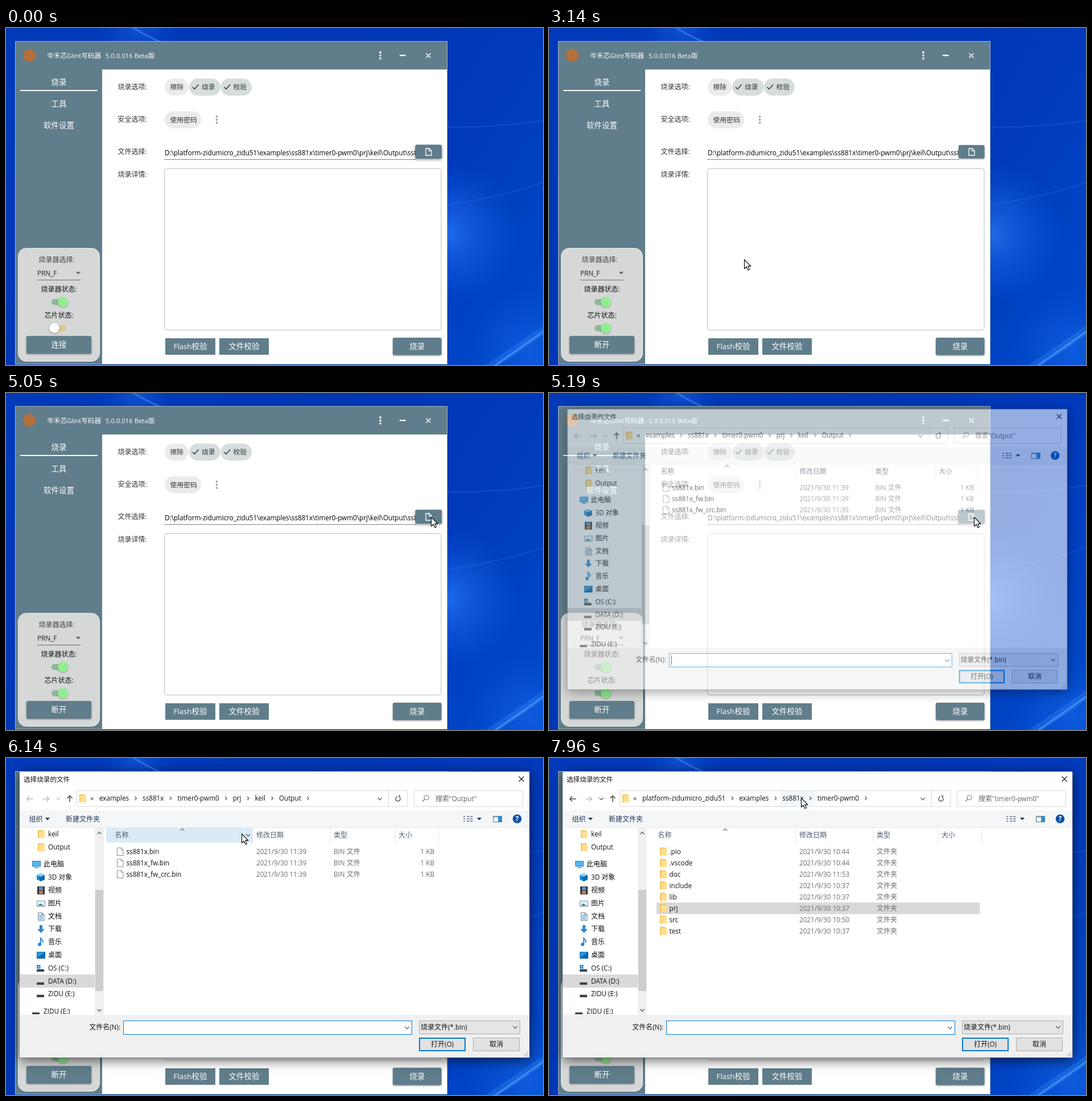
An HTML page with a canvas that plays this animation: 944x593 px, repeating every 8 s.

```html
<!DOCTYPE html>
<html lang="zh-CN">
<head>
<meta charset="utf-8">
<style>
html, body { margin: 0; width: 100%; height: 100%; overflow: hidden; background: #0038b8; }
canvas { display: block; }
</style>
</head>
<body>
<canvas id="stage" width="944" height="593"></canvas>
<script>
const LOOP = 8000, W = 944, H = 593, SLATE = '#607d8b';
const LATIN = '"Open Sans","Noto Sans",sans-serif';
const HAN = '"Noto Sans CJK SC","Noto Sans CJK","Noto Sans",sans-serif';
const screen = document.getElementById('stage').getContext('2d');
let g = screen;

function layer() {
  const c = document.createElement('canvas');
  c.width = W; c.height = H;
  return c.getContext('2d');
}
const clamp = v => Math.max(0, Math.min(1, v));
const ramp = (t, a, b) => clamp((t - a) / (b - a));
const ease = p => 1 - (1 - p) ** 3;

function rect(x, y, w, h, fill) { g.fillStyle = fill; g.fillRect(x, y, w, h); }
function frame(x, y, w, h, color, lw = 1) {
  g.strokeStyle = color; g.lineWidth = lw;
  g.strokeRect(x + lw / 2, y + lw / 2, w - lw, h - lw);
}
function round(x, y, w, h, r, fill, edge) {
  g.beginPath(); g.roundRect(x, y, w, h, r);
  if (fill) { g.fillStyle = fill; g.fill(); }
  if (edge) { g.strokeStyle = edge; g.lineWidth = 1; g.stroke(); }
}
function disc(x, y, r, fill) {
  g.beginPath(); g.arc(x, y, r, 0, 7); g.fillStyle = fill; g.fill();
}
function line(pts, color, lw = 1) {
  g.beginPath();
  for (let i = 0; i < pts.length; i += 2) g.lineTo(pts[i], pts[i + 1]);
  g.strokeStyle = color; g.lineWidth = lw; g.stroke();
}
function poly(pts, fill) {
  g.beginPath();
  for (let i = 0; i < pts.length; i += 2) g.lineTo(pts[i], pts[i + 1]);
  g.closePath(); g.fillStyle = fill; g.fill();
}
function shadow(blur, dy, color, draw) {
  g.save();
  g.shadowBlur = blur; g.shadowOffsetY = dy; g.shadowColor = color;
  draw();
  g.restore();
}

// Han and Latin runs are set in separate faces; y is the visual centre.
function runs(str, size, weight) {
  return str.match(/[\u3000-\u9fff]+|[^\u3000-\u9fff]+/g).map(s => {
    const han = s.charCodeAt(0) >= 0x3000;
    const font = `${weight} ${han ? size : size * 0.975}px ${han ? HAN : LATIN}`;
    g.font = font;
    return { s, font, w: g.measureText(s).width };
  });
}
function text(str, x, y, color = '#222', size = 12, align = 0, weight = 400) {
  const parts = runs(str, size, weight);
  const width = parts.reduce((sum, p) => sum + p.w, 0);
  x -= width * align;
  g.fillStyle = color;
  for (const p of parts) {
    g.font = p.font;
    g.fillText(p.s, x, Math.round(y + size * 0.37));
    x += p.w;
  }
  return width;
}

function wallpaper() {
  const base = g.createLinearGradient(0, 0, W, H);
  base.addColorStop(0, '#003aba');
  base.addColorStop(0.45, '#0036b4');
  base.addColorStop(0.7, '#0039bb');
  base.addColorStop(1, '#004bcc');
  rect(0, 0, W, H, base);
  const glow = (x, y, r, color) => {
    const grad = g.createRadialGradient(x, y, 0, x, y, r);
    grad.addColorStop(0, color);
    grad.addColorStop(1, 'rgba(20,90,225,0)');
    rect(0, 0, W, H, grad);
  };
  glow(778, 362, 125, 'rgba(40,120,245,.75)');
  glow(230, 0, 70, 'rgba(40,110,235,.45)');
  glow(920, 570, 110, 'rgba(30,110,240,.5)');
  const arc = (a, color, lw) => {
    g.beginPath(); g.moveTo(a[0], a[1]);
    g.quadraticCurveTo(a[2], a[3], a[4], a[5]);
    g.strokeStyle = color; g.lineWidth = lw; g.stroke();
  };
  arc([218, -4, 242, 12, 275, 26], 'rgba(70,150,255,.5)', 3);
  arc([770, 174, 860, 176, 944, 163], 'rgba(40,115,235,.35)', 2);
  arc([770, 312, 870, 298, 944, 272], 'rgba(40,115,235,.35)', 2);
  arc([845, 600, 900, 563, 950, 528], 'rgba(60,150,255,.25)', 14);
  arc([850, 600, 905, 563, 950, 530], 'rgba(100,180,255,.5)', 3);
}

function button(label, x, y, w, h, raised = 0) {
  const p = raised;
  shadow(3 + 2 * p, 1 + p * 0.5, 'rgba(0,0,0,.45)', () =>
    round(x - p / 2, y - p / 2, w + p, h + p, 2.5, SLATE));
  if (label) text(label, x + w / 2, y + h / 2, '#fff', 13.5, 0.5);
}
function flatButton(label, x, y, w, h) {
  rect(x, y, w, h, SLATE);
  text(label, x + w / 2, y + h / 2, '#fff', 13.5, 0.5);
}
function toggle(y, p, offTrack) {
  round(80, y - 5, 26, 10.5, 5, offTrack);
  g.globalAlpha = p;
  round(80, y - 5, 26, 10.5, 5, '#8fb79b');
  g.globalAlpha = 1;
  const x = 85 + 15 * p;
  shadow(3, 1, 'rgba(0,0,0,.4)', () => disc(x, y, 8.8, '#fff'));
  g.globalAlpha = p;
  disc(x, y, 8.8, '#90ee90');
  g.globalAlpha = 1;
}
function chip(label, x, y, w, on) {
  round(x, y, w, 30, 15, on ? '#d5dedd' : '#ebebeb');
  if (on) line([x + 6, y + 15, x + 9.5, y + 18.5, x + 16.5, y + 10.5], '#333', 1.5);
  text(label, x + (on ? 22 : 9.5), y + 15, '#333', 11.8);
}

function appWindow() {
  rect(16, 23, 760, 569, '#a9b8bf');
  rect(17, 24, 758, 567, SLATE);
  rect(169, 73, 606, 518, '#fff');

  disc(41, 48, 11, '#b4703a');
  text('岑禾芯Glint写码器', 72, 49, '#fff', 11.7, 0, 500);
  text('5.0.0.016 Beta版', 175, 49, '#fff', 11.6, 0, 500);
  for (const y of [43, 48.3, 53.6]) disc(658, y, 1.9, '#fff');
  rect(692, 47, 10.5, 2.4, '#fff');
  line([738.5, 44.5, 746.5, 52.5], '#fff', 1.5);
  line([746.5, 44.5, 738.5, 52.5], '#fff', 1.5);

  ['烧录', '工具', '软件设置'].forEach((s, i) => text(s, 93, 95 + 38 * i, '#fff', 13.5, 0.5));
  rect(25, 109, 136, 2, '#fff');

  round(21.5, 387.5, 143, 199, 14, '#d6d7d7', '#eceeee');
  text('烧录器选择:', 89, 408, '#444', 12, 0.5);
  text('PRN_F', 55, 432, '#222');
  poly([123, 429, 131, 429, 127, 433.5], '#666');
  rect(55, 443, 76, 1, '#6b6b6b');
  text('烧录器状态:', 93, 460, '#111', 12, 0.5);
  text('芯片状态:', 93, 506, '#111', 12, 0.5);
  toggle(482, 1, '#dcc98f');

  ['烧录选项:', '安全选项:', '文件选择:', '烧录详情:'].forEach((s, i) =>
    text(s, 196.5, [104, 161, 218, 258][i], '#333'));
  chip('擦除', 279, 89, 42, false);
  chip('烧录', 322, 89, 55, true);
  chip('校验', 377.5, 89, 54.5, true);
  chip('使用密码', 279, 146.5, 64, false);
  for (const y of [156, 161.5, 167]) disc(370.5, y, 1.9, '#a8a8a8');

  g.save();
  g.beginPath(); g.rect(278, 205, 442, 30); g.clip();
  text('D:\\platform-zidumicro_zidu51\\examples\\ss881x\\timer0-pwm0\\prj\\keil\\Output\\ss881x_fw.bin',
    279, 220, '#000');
  g.restore();
  rect(278, 231, 443, 1, '#808080');
  round(278.5, 247.5, 486.5, 284, 4, '#fff', '#bcbcbc');
  flatButton('Flash校验', 280, 546, 88, 29);
  flatButton('文件校验', 375, 546, 87, 29);
  button('烧录', 680, 545, 85.5, 30.5);
}

const backdrop = layer();
g = backdrop;
wallpaper();
appWindow();

function liveWindow(t) {
  toggle(528, ease(ramp(t, 2100, 2320)), '#dcc98f');
  button(t < 2100 ? '连接' : '断开', 36, 542, 114, 31,
    ramp(t, 1000, 1300) * (1 - ramp(t, 2800, 3000)));
  const p = ramp(t, 1690, 1960);
  if (p > 0 && p < 1) {
    g.save();
    g.beginPath(); g.rect(36, 542, 114, 31); g.clip();
    disc(99, 557, 80 * ease(p), `rgba(255,255,255,${0.3 * (1 - p)})`);
    g.restore();
  }
  button('', 720, 206, 45.5, 23.5, t < 2000 ? 1 - ramp(t, 70, 350) : ramp(t, 4500, 4700));
  line([738, 212, 744, 212, 748, 216, 748, 224, 738, 224, 738, 211.5], '#fff', 1.3);
  line([743.5, 212, 743.5, 216.5, 748, 216.5], '#fff', 1.2);
}

const chevron = (x, y, color = '#555', d = 1) =>
  line([x - 3.5, y - 2 * d, x, y + 1.8 * d, x + 3.5, y - 2 * d], color, 1.2);
const arrow = (x, y, dir, color) => {
  line([x - 5.5, y, x + 5.5, y], color, 1.5);
  line([x + dir, y - 4.5, x + dir * 5.5, y, x + dir, y + 4.5], color, 1.5);
};
function folder(x, y) {
  poly([x, y - 7, x + 8, y - 7, x + 12, y - 5, x + 12, y + 7, x, y + 7], '#f5c65a');
  rect(x + 2, y - 5, 10, 12, '#ffdf8f');
}
function sheet(x, y, edge = '#8b8b8b') {
  g.fillStyle = '#fff'; g.fillRect(x, y - 7, 11, 14);
  line([x + 7.5, y - 6.5, x + .5, y - 6.5, x + .5, y + 7, x + 11, y + 7, x + 11, y - 3, x + 7.5, y - 6.5], edge);
  line([x + 7.5, y - 6.5, x + 7.5, y - 3, x + 11, y - 3], edge);
}
function drive(x, y, system) {
  rect(x + 1, y + 1, 12, 2, '#b8b8b8');
  rect(x, y + 2, 13, 4, '#444');
  if (system) for (let i = 0; i < 4; i++) rect(x + i % 2 * 3.5, y - 6 + (i >> 1) * 3.5, 3, 3, '#1b87d6');
}
function monitor(x, y) {
  rect(x, y - 6, 15, 10, '#2386c8');
  rect(x + 1, y - 5, 13, 8, '#52b7ee');
  rect(x + 4, y + 5, 7, 1.5, '#5c7482');
}
const treeIcons = {
  folder, drive, monitor,
  os: (x, y) => drive(x, y, true),
  cube(x, y) {
    poly([x, y - 4, x + 7, y - 7, x + 14, y - 4, x + 14, y + 4, x + 7, y + 7, x, y + 4], '#1b8fd8');
    poly([x, y - 4, x + 7, y - 7, x + 14, y - 4, x + 7, y - 1], '#7fd0f5');
    poly([x + 4, y, x + 14, y - 4, x + 14, y + 4, x + 7, y + 7], '#1467b0');
  },
  film(x, y) {
    rect(x + 1, y - 7, 13, 14, '#333');
    rect(x + 4, y - 6, 7, 6, '#5b8fd0');
    rect(x + 4, y + 1, 7, 5, '#c78246');
  },
  picture(x, y) {
    rect(x, y - 5, 15, 11, '#8a969e');
    rect(x + 1, y - 4, 13, 9, '#e4f3fb');
    poly([x + 2, y + 4, x + 6, y, x + 9, y + 2, x + 13, y + 4], '#3b7f91');
  },
  page(x, y) {
    sheet(x + 2, y, '#57798d');
    for (let i = 0; i < 4; i++) rect(x + 4, y - 3 + i * 2.3, 7, 1, '#2f86c7');
  },
  down(x, y) {
    poly([x + 5, y - 7, x + 10, y - 7, x + 10, y, x + 14, y, x + 7.5, y + 7, x + 1, y, x + 5, y], '#2a8bd8');
  },
  note(x, y) {
    disc(x + 5, y + 4, 3, '#1d86dc');
    line([x + 7, y + 4, x + 7, y - 7, x + 11, y - 2, x + 10, y + 1], '#1d86dc', 1.8);
  },
  desk(x, y) {
    rect(x, y - 6, 15, 12, '#0d67ae');
    poly([x + 1, y - 5, x + 14, y - 5, x + 1, y + 4], '#249be6');
  }
};
const tree = [
  ['folder', 'keil', 134], ['folder', 'Output', 157], ['monitor', '此电脑', 187, -8],
  ['cube', '3D 对象', 210], ['film', '视频', 233], ['picture', '图片', 256],
  ['page', '文档', 279], ['down', '下载', 301], ['note', '音乐', 324],
  ['desk', '桌面', 347], ['os', 'OS (C:)', 370], ['drive', 'DATA (D:)', 393],
  ['drive', 'ZIDU (E:)', 415], ['drive', 'ZIDU (E:)', 446, -8]
];
const binFiles = ['', '_fw', '_fw_crc'].map(s => [`ss881x${s}.bin`, '11:39']);
const folders = [['.pio', '10:44'], ['.vscode', '10:44'], ['doc', '11:53'], ['include', '10:37'],
  ['lib', '10:37'], ['prj', '10:37'], ['src', '10:50'], ['test', '10:37']];

function sidebarTree() {
  g.save();
  g.beginPath(); g.rect(24, 123, 148, 328); g.clip();
  rect(24, 381, 132, 23, '#d9d9d9');
  for (const [icon, label, y, dx = 0] of tree) {
    treeIcons[icon](54 + dx + (icon === 'folder' ? 2 : 0), y);
    text(label, 74 + dx, y, '#111');
  }
  g.restore();
  rect(156, 123, 16, 328, '#f0f0f0');
  rect(157, 232, 14, 178, '#cdcdcd');
  chevron(164, 132, '#505050', -1);
  chevron(164, 444, '#505050');
}

function addressBar(t, parent, mouse) {
  const idle = '#bdbdbd', ink = '#444';
  arrow(42, 72, -1, parent ? ink : idle);
  arrow(70, 72, 1, idle);
  chevron(92, 72, parent ? ink : idle, 0.8);
  line([112, 66.5, 112, 77.5], ink, 1.5);
  line([107.5, 71, 112, 66.5, 116.5, 71], ink, 1.5);
  frame(124, 57, 582, 29, '#d9d9d9');
  rect(672, 58, 1, 27, '#d9d9d9');
  folder(129, 71);
  text('«', 148, 70, '#333', 13);
  const crumbs = parent
    ? ['platform-zidumicro_zidu51', 'examples', 'ss881x', 'timer0-pwm0']
    : ['examples', 'ss881x', 'timer0-pwm0', 'prj', 'keil', 'Output'];
  let x = 164;
  for (const c of crumbs) {
    const w = runs(c, 12, 400)[0].w;
    if (t > 6450 && mouse.y < 86 && mouse.x > x - 4 && mouse.x < x + w + 20) {
      const tint = parent ? '#f0f8fe' : t > 6600 && t < 6800 ? '#cce8ff' : '#e5f3ff';
      rect(x - 4, 58, w + 24, 27, tint);
    }
    text(c, x, 71, '#111');
    line([x + w + 10.5, 68, x + w + 13.5, 71, x + w + 10.5, 74], '#555', 1.2);
    x += w + 24;
  }
  chevron(657, 72);
  g.beginPath(); g.arc(689, 72, 4, -0.6, 4.4);
  g.strokeStyle = '#555'; g.lineWidth = 1.4; g.stroke();
  poly([689, 66, 693, 66, 693, 70], '#555');
  frame(717, 57, 192, 29, '#d9d9d9');
  g.beginPath(); g.arc(739, 69.5, 4, 0, 7);
  g.strokeStyle = '#777'; g.lineWidth = 1.1; g.stroke();
  line([736, 72.5, 732, 76.5], '#777', 1.2);
  text(`搜索"${parent ? 'timer0-pwm0' : 'Output'}"`, 755, 72, '#666');
}

function toolbar() {
  rect(24, 92, 896, 31, '#f5f6f7');
  rect(24, 122, 896, 1, '#e6e8ea');
  const ink = '#1e395b';
  text('组织', 40.5, 107.5, ink);
  poly([69, 105, 77, 105, 73, 109.5], ink);
  text('新建文件夹', 105, 107.5, ink);
  for (let i = 0; i < 9; i++) rect(804 + i % 3 * 6, 102 + (i / 3 | 0) * 4, i % 3 ? 4.5 : 3, 2, '#8390a0');
  poly([828, 105, 836, 105, 832, 109.5], ink);
  frame(856, 102, 16, 11, '#5a7a96');
  rect(857, 103, 14, 2, '#9ec4e2');
  rect(865, 103, 6, 9, '#2b8fd8');
  disc(898.5, 107, 7.8, '#0a52a8');
  text('?', 898.5, 107, '#fff', 12, 0.5, 700);
}

function fileList(parent, mouse, active) {
  const hot = active && mouse.y > 123 && mouse.y < 149 && mouse.x > 176 && mouse.x < 433;
  if (hot) {
    rect(176, 123, 257, 26, '#d9ebf9');
    rect(417, 123, 1, 26, '#f3f9fd');
    chevron(425.5, 136);
  }
  for (const x of [433, 570, 684, 760]) rect(x, 123, 1, 27, '#e5e5e5');
  ['名称', '修改日期', '类型', '大小'].forEach((s, i) =>
    text(s, [191.5, 440, 576, 690][i], 136, '#4c5a6b'));
  chevron(310, 126, '#777', -1);
  const rows = parent ? folders : binFiles;
  const over = active && mouse.x > 189 && mouse.x < 757 ? Math.floor((mouse.y - 154.5) / 19.95) : -1;
  rows.forEach(([name, time], i) => {
    const y = 165 + 19.95 * i;
    if (name === 'prj') rect(189, y - 10.5, 568, 20.5, '#d9d9d9');
    else if (i === over) rect(189, y - 10.5, 568, 20.5, '#e5f3ff');
    (parent ? folder : sheet)(195, y - 0.5);
    text(name, 211.5, y, '#111');
    text('2021/9/30 ' + time, 440, y, '#6d6d6d');
    text(parent ? '文件夹' : 'BIN 文件', 576, y, '#6d6d6d');
    if (!parent) text('1 KB', 753, y, '#6d6d6d', 12, 1);
  });
}

function footer(caret) {
  rect(24, 452, 896, 75, '#f0f0f0');
  text('文件名(N):', 201, 474, '#111', 12, 1);
  rect(206, 462, 508, 25, '#fff');
  frame(206, 462, 508, 25, '#0078d7');
  if (caret) rect(210, 466, 1, 17, '#000');
  chevron(705, 475);
  rect(726, 462, 178, 24, '#e5e5e5');
  frame(726, 462, 178, 24, '#adadad');
  text('烧录文件(*.bin)', 729, 474, '#111');
  chevron(895, 474);
  rect(726, 492, 82, 24, '#e1e1e1');
  frame(726, 492, 82, 24, '#0078d7', 2);
  text('打开(O)', 767, 504, '#111', 12, 0.5);
  rect(821, 492, 82, 24, '#e1e1e1');
  frame(821, 492, 82, 24, '#adadad');
  text('取消', 862, 504, '#111', 12, 0.5);
  for (let i = 0; i < 3; i++)
    for (let j = 0; j <= i; j++) rect(916 - j * 3, 517 + i * 3, 2, 2, '#bfbfbf');
}

const sheetLayer = layer();
function dialog(t, mouse) {
  const parent = t >= 7210;
  g = sheetLayer;
  g.clearRect(0, 0, W, H);
  shadow(20, 4, 'rgba(0,0,0,.6)', () => rect(23.5, 23.5, 897, 504, '#5d6a75'));
  rect(24, 24, 896, 503, '#fff');
  text('选择烧录的文件', 31, 38, '#111', 11.6);
  line([901.5, 32.5, 910.5, 41.5], '#222', 1.2);
  line([910.5, 32.5, 901.5, 41.5], '#222', 1.2);
  addressBar(t, parent, mouse);
  toolbar();
  sidebarTree();
  fileList(parent, mouse, t > 5390);
  footer(t < 5650 || t >= 6180 && t < 6610 || t >= 7140 && t < 7670);
  g = screen;
  const p = ramp(t, 5080, 5390), rest = (1 - p) ** 2;
  g.save();
  g.globalAlpha = 1 - rest;
  g.translate(472 - rest, 275.5 - rest);
  g.scale(1 - 0.048 * rest, 1 - 0.048 * rest);
  g.drawImage(sheetLayer.canvas, -472, -275.5);
  g.restore();
}

const track = [
  [0, 776, 610], [70, 779, 588], [250, 600, 566], [500, 270, 545], [810, 59, 522],
  [1050, 86, 562], [1360, 98, 555], [2600, 98, 555], [2860, 207, 517], [3140, 342, 407],
  [3680, 630, 265], [4400, 747, 218], [5600, 747, 218], [6140, 414, 133], [6340, 352, 74],
  [7300, 352, 74], [7890, 417, 70], [7960, 443, 70], [LOOP, 443, 70]
];
function pointer(t) {
  const i = track.findIndex(k => k[0] > t);
  const [t0, x0, y0] = track[i - 1], [t1, x1, y1] = track[i];
  const p = (t - t0) / (t1 - t0);
  return { x: x0 + (x1 - x0) * p, y: y0 + (y1 - y0) * p };
}
const ARROW = [0, 0, 0, 16, 3.7, 12.6, 6.3, 18.4, 8.8, 17.3, 6.3, 11.6, 11.3, 11.6];
const HAND = [-1.5, 1, 0, 0, 1.5, 1, 1.5, 6.5, 4, 7, 7, 8, 9.5, 10, 9.5, 14, 8, 18, 8, 21,
  -2, 21, -2, 18.5, -5.5, 13, -5.5, 11, -4, 10.5, -1.5, 13];
function drawPointer(t, { x, y }) {
  const inside = (l, u, w, h) => x >= l && x <= l + w && y >= u && y <= u + h;
  const hand = t < 4980 && (inside(36, 542, 114, 31) && t > 810 || inside(720, 206, 46, 24));
  g.save();
  g.translate(Math.round(x) + 0.5, Math.round(y) + 0.5);
  g.lineJoin = 'round';
  const pts = hand ? HAND : ARROW;
  poly(pts, '#fff');
  line([...pts, pts[0], pts[1]], '#000', 1.1);
  if (hand) for (const dx of [1.5, 4, 6.7]) line([dx, 7.5, dx, 11], '#000');
  g.restore();
}

function draw(now) {
  const t = now % LOOP, mouse = pointer(t);
  g = screen;
  g.drawImage(backdrop.canvas, 0, 0);
  liveWindow(t);
  if (t > 5080) dialog(t, mouse);
  if (t >= 70) drawPointer(t, mouse);
}
const start = performance.now();
(function tick() {
  draw(performance.now() - start);
  requestAnimationFrame(tick);
})();
</script>
</body>
</html>
```
